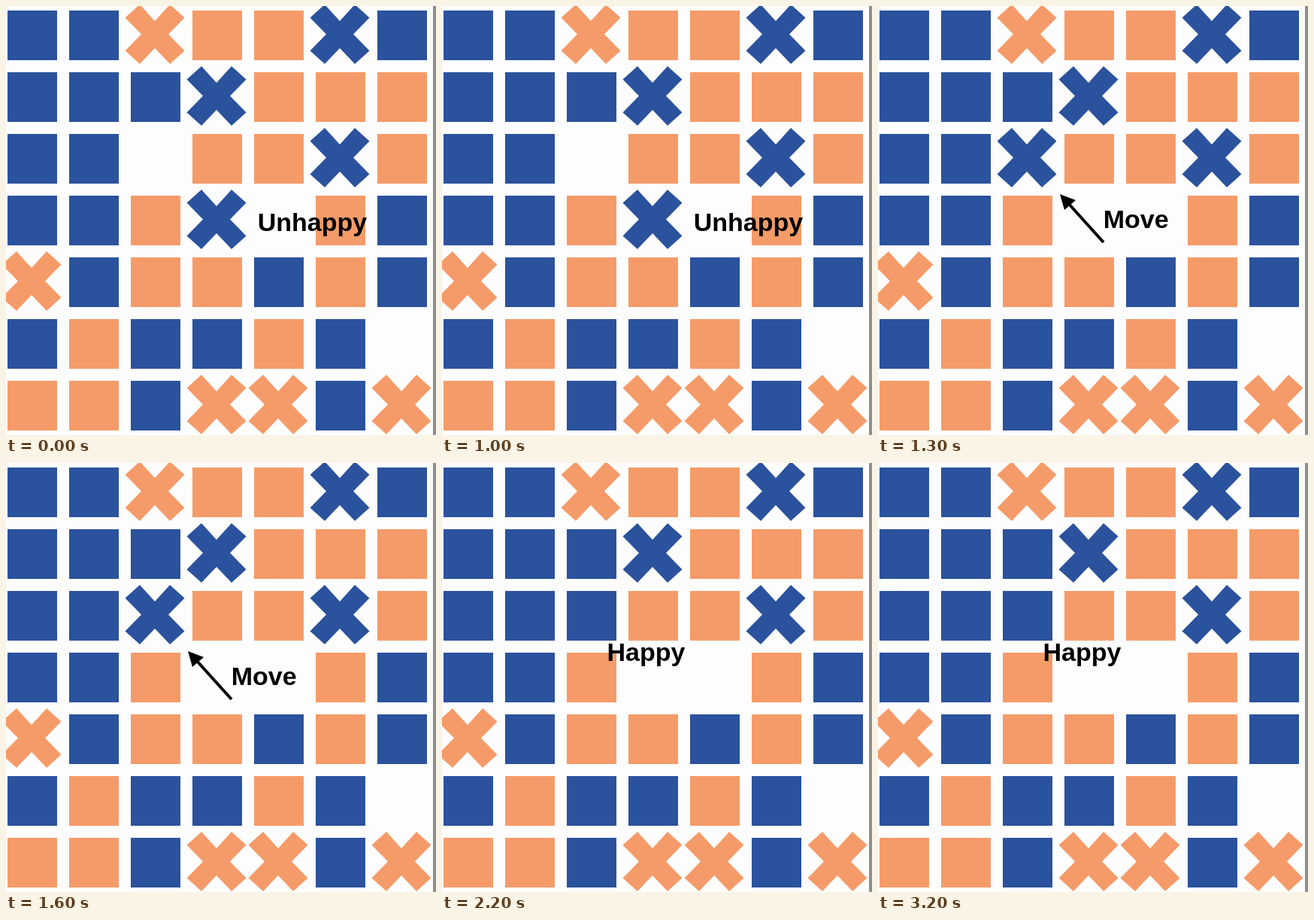
An HTML page with a canvas for the animation above (3300 ms loop, 572 px wide and 570 px high).

```html
<!DOCTYPE html>
<html lang="en">
<head>
<meta charset="utf-8">
<style>
html, body { margin: 0; width: 100%; height: 100%; overflow: hidden; background: #fdfdfd; }
canvas { display: block; }
</style>
</head>
<body>
<canvas id="stage" width="572" height="570"></canvas>
<script>
const ctx = document.getElementById('stage').getContext('2d');
const BLUE = '#2b529c', ORANGE = '#f59b69';

// b/o: happy squares, B/O: unhappy crosses, dot: empty cell
const BOARD = ['bbOooBb', 'bbbBooo', 'bb.ooBo', 'bboB.ob', 'Oboobob', 'bobbob.', 'oobOObO'];

const CROSS = [[-39.5, -22], [-20, -39.5], [0, -17.5], [20, -39.5], [39.5, -22], [18, 0],
  [39.5, 22], [20, 39.5], [0, 18.5], [-20, 39.5], [-39.5, 22], [-18, 0]];

function polygon(points, x, y, color) {
  ctx.fillStyle = color;
  ctx.beginPath();
  for (const [px, py] of points) ctx.lineTo(x + px, y + py);
  ctx.fill();
}

function cell(kind, col, row) {
  if (kind === '.') return;
  const color = kind.toLowerCase() === 'b' ? BLUE : ORANGE;
  const x = 2 + col * 82, y = 6 + row * 82;
  if (kind === 'B' || kind === 'O') {
    polygon(CROSS, x + 32, y + 31.5, color);
  } else {
    ctx.fillStyle = color;
    ctx.fillRect(x, y, 66, 66);
  }
}

function label(text, x, y) {
  ctx.fillStyle = '#000';
  ctx.font = 'bold 34px "Liberation Sans", Arial, sans-serif';
  ctx.fillText(text, x, y);
}

function arrow() {
  ctx.lineWidth = 4;
  ctx.strokeStyle = '#000';
  ctx.beginPath();
  ctx.moveTo(300, 314);
  ctx.lineTo(253, 262);
  ctx.stroke();
  polygon([[0, 0], [21, 8], [6, 21]], 242, 250, '#000');
}

function draw(phase) {
  ctx.fillStyle = '#fdfdfd';
  ctx.fillRect(0, 0, 572, 570);
  ctx.fillStyle = '#8f8f8b';
  ctx.fillRect(568, 0, 4, 570);
  BOARD.forEach((line, row) => [...line].forEach((kind, col) => {
    // the mover leaves (3, 3) and settles at (2, 2)
    if (row === 2 && col === 2) kind = '.Bb'[phase];
    if (row === 3 && col === 3 && phase) kind = '.';
    cell(kind, col, row);
  }));
  if (phase === 0) label('Unhappy', 334.7, 299);
  if (phase === 1) { arrow(); label('Move', 299.7, 295); }
  if (phase === 2) label('Happy', 219.5, 263);
}

function tick() {
  const t = performance.now() % 3300;
  draw(t < 1200 ? 0 : t < 2200 ? 1 : 2);
  requestAnimationFrame(tick);
}
tick();
</script>
</body>
</html>
```
